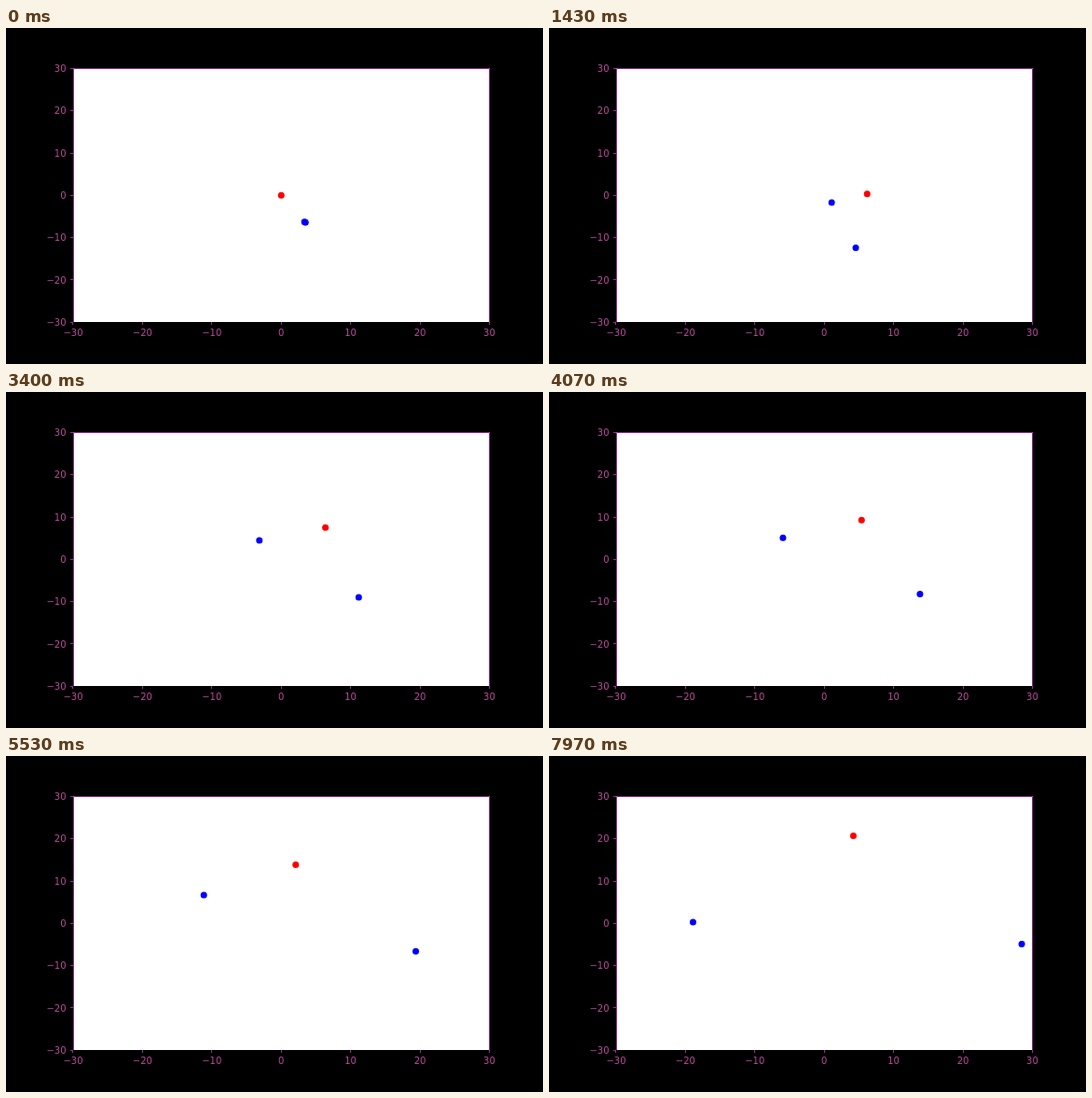
An HTML page for the animation above (8000 ms loop, 576 by 360 pixels).

```html
<!DOCTYPE html>
<html lang="en">
<head>
<meta charset="utf-8">
<title>Three wandering points</title>
<style>
  html, body { margin: 0; width: 100%; height: 100%; overflow: hidden; background: #000; }
  svg { display: block; width: 576px; height: 360px; }
  text { font: 10px "DejaVu Sans", sans-serif; fill: #b84a9c; }
  .spine { fill: none; stroke: #943094; }
</style>
</head>
<body>
<svg id="stage" viewBox="0 0 576 360">
  <rect width="576" height="360"/>
  <rect x="72" y="43" width="447" height="272" fill="#fff"/>
  <path class="spine" d="M72.5 315V43.5H518.5V315"/>
</svg>
<script>
const LOOP = 8000, FPS = 30;

// Key points in axis units, evenly spaced over the loop.
const walkers = [
  { color: '#f00', points: [[0, 0], [5.95, 0.1], [6.9, 5.4], [5.5, 9.1], [2.5, 13.2], [0.5, 17.5], [4.3, 20.8]] },
  { color: '#00f', points: [[3.35, -6.3], [1.2, -2.1], [-0.4, 3.4], [-5.7, 5], [-10.4, 6.8], [-15.5, 4.5], [-19, 0.2]] },
  { color: '#00f', points: [[3.5, -6.4], [4.35, -12.3], [8.4, -9.9], [13.55, -8.3], [18.65, -6.9], [23.6, -4.9], [28.6, -4.9]] }
];

const toX = x => 295.2 + 7.44 * x;
const toY = y => 179.3 - 4.53 * y;
const stage = document.getElementById('stage');

function add(tag, attrs, content = '') {
  const node = document.createElementNS('http://www.w3.org/2000/svg', tag);
  for (const name in attrs) node.setAttribute(name, attrs[name]);
  node.textContent = content;
  return stage.appendChild(node);
}

function drawAxes() {
  for (let value = -30; value <= 30; value += 10) {
    const x = toX(value), y = toY(value);
    const name = String(value).replace('-', '\u2212');
    add('path', {
      class: 'spine',
      d: `M${Math.floor(x) + 0.5} 315v3M69 ${Math.floor(y) + 0.5}h3`
    });
    add('text', { x, y: 330, 'text-anchor': 'middle' }, name);
    add('text', { x: 64.5, y: y + 3.7, 'text-anchor': 'end' }, name);
  }
}

// Catmull-Rom curve; the ends are continued by reflection.
function pointAt(points, progress) {
  const last = points.length - 1;
  const i = Math.min(Math.floor(progress * last), last - 1);
  const u = progress * last - i;
  return [0, 1].map(axis => {
    const b = points[i][axis], c = points[i + 1][axis];
    const a = i > 0 ? points[i - 1][axis] : 2 * b - c;
    const d = i + 2 <= last ? points[i + 2][axis] : 2 * c - b;
    return b + u / 2 * (c - a + u * (2 * a - 5 * b + 4 * c - d + u * (3 * (b - c) + d - a)));
  });
}

drawAxes();
for (const walker of walkers) {
  walker.dot = add('circle', { r: 3.5, fill: walker.color });
}

function draw(ms) {
  const frames = LOOP * FPS / 1000;
  const frame = Math.floor((ms % LOOP + 3.4) * FPS / 1000) % frames;
  for (const { dot, points } of walkers) {
    const [x, y] = pointAt(points, frame / frames);
    dot.setAttribute('cx', toX(x));
    dot.setAttribute('cy', toY(y));
  }
}

const start = performance.now();
function tick() {
  draw(performance.now() - start);
  requestAnimationFrame(tick);
}
tick();
</script>
</body>
</html>
```
